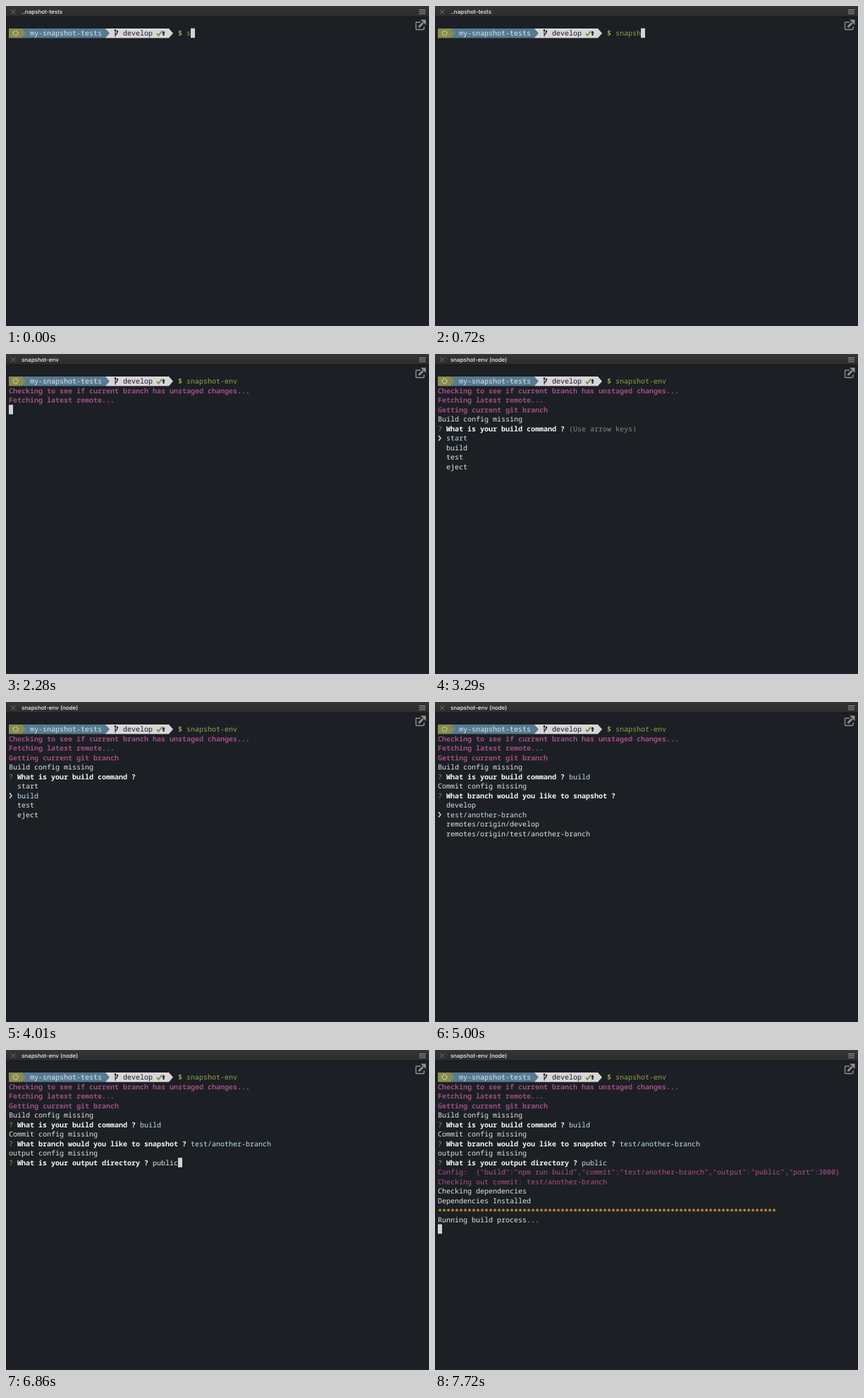
An HTML page that plays this animation: 600 px wide and 455 px high, repeating every 8000 ms.

```html
<!DOCTYPE html>
<html lang="en">
<head>
<meta charset="utf-8">
<title>Terminal session</title>
<style>
  html, body { margin: 0; width: 100%; height: 100%; overflow: hidden; background: #1c2024; }
  svg { display: block; width: 600px; height: 455px; }
  text { white-space: pre; text-rendering: geometricPrecision; }
  #title { font: 500 8px Inter, sans-serif; fill: #f2f2f2; }
  .mono text { font: 500 10px "Noto Sans Mono", "DejaVu Sans Mono", monospace; fill: #e6e6e4; }
  .mono .cmd { fill: #98a04c; font-weight: 400; }
  .mono .dollar { fill: #a9ab55; font-weight: 600; }
  .mono .dir { fill: #e0e5e8; font-weight: 400; }
  .mono .branch { fill: #17181a; font-weight: 400; }
  .mono .log { fill: #a04c84; font-weight: 600; }
  .mono .info { fill: #b04f8e; }
  .mono .mark { fill: #8f9a3c; }
  .mono .ask { fill: #f6f6f4; font-weight: 700; }
  .mono .pick { fill: #c3def3; }
  .mono .hint { fill: #85898c; font-weight: 400; }
  .mono .stars { fill: #d9a441; font-weight: 700; }
  .caret { fill: #d2d3d3; }
</style>
</head>
<body>
<svg viewBox="0 0 600 455">
  <defs>
    <linearGradient id="bar" x2="0" y2="1">
      <stop offset="0" stop-color="#363636"/>
      <stop offset="1" stop-color="#2b2b2b"/>
    </linearGradient>
  </defs>
  <rect width="600" height="455" fill="#1c2024"/>
  <rect width="600" height="15.5" fill="url(#bar)"/>
  <rect y="15" width="600" height="1" fill="#121416"/>
  <rect y="454" width="600" height="1" fill="#1b2546"/>
  <path d="M7 5l6.5 6.5M13.500 5L7 11.500" stroke="#7c7c7c" stroke-width=".9"/>
  <text id="title" x="22" y="11"></text>
  <path d="M586 5.500h9M586 8.200h9M586 10.900h9" stroke="#a2a2a2"/>
  <g fill="none" stroke="#8f9294">
    <path d="M588 23h-5.500q-1 0-1 1v8.500q0 1 1 1h9.500q1 0 1-1V29" stroke-width="1.400"/>
    <path d="M585.500 30l6-6" stroke-width="2.800"/>
    <path d="M588 19.500h7.500V27z" fill="#8f9294" stroke="none"/>
  </g>

  <path d="M141 32h90l6 6.750-6 6.750h-90z" fill="#d9d6da"/>
  <path d="M22 32h119l6 6.750-6 6.750H22z" fill="#577a92"/>
  <path d="M4 32h18l6 6.750-6 6.750H4z" fill="#888b50"/>
  <circle cx="13.500" cy="38.700" r="3.300" fill="none" stroke="#d8d49a" stroke-width="1.300" stroke-dasharray="1.800 .8"/>
  <path d="M155 34v9.500M155 41q3-1 3-4.500" fill="none" stroke="#1b1b1d" stroke-width="1.100"/>
  <circle cx="155" cy="34.500" r="1.300" fill="#1b1b1d"/>
  <circle cx="158" cy="36" r="1.200" fill="#1b1b1d"/>
  <path d="M214 39l2.300 2.800 5-6.300" fill="none" stroke="#7c9440" stroke-width="2"/>
  <path d="M223.500 35.300l2.300 3h-1.200v3.700h-2.200v-3.700h-1.200z" fill="#24262a"/>
  <g class="mono">
    <text class="dir" x="34" y="42">my-snapshot-tests</text>
    <text class="branch" x="166" y="42">develop</text>
    <text class="dollar" x="244" y="42">$</text>
    <g id="screen"></g>
  </g>
</svg>
<script>
  const LOOP = 8000, STEPS_PER_MS = 7 / 1000, CELL = 6, LINE = 13.5;
  const COMMAND = "snapshot-env", FOLDER = "public", BRANCH = "test/another-branch";

  // Key moments, counted in seventh-of-a-second steps.
  const AT = {
    run: 12, check: 14, fetch: 15, branch: 18, build: 19, pickBuild: 26,
    commit: 30, pickCommit: 35, output: 39, type: 43, finish: 49
  };

  const colX = col => 4 + col * CELL;
  const put = (row, col, cls, str, dy = 0) =>
    `<text class="${cls}" x="${colX(col)}" y="${42 + row * LINE + dy}">${str}</text>`;
  const caret = (row, col) =>
    `<rect class="caret" x="${colX(col)}" y="${31.75 + row * LINE}" width="6" height="13.5"/>`;
  const pointer = row =>
    `<path d="M5 ${35 + row * LINE}l3 3.7-3 3.7" fill="none" stroke="#c3def3" stroke-width="1.5"/>`;

  const ask = (row, question, reply = "", cls = "pick") =>
    put(row, 0, "mark", "?") + put(row, 2, "ask", question) +
    put(row, question.length + 3, cls, reply);

  const list = (row, question, items, picked) =>
    ask(row, question, picked ? "" : "(Use arrow keys)", "hint") +
    items.map((item, i) => {
      const y = row + 1 + i, on = i === picked;
      return (on ? pointer(y) : "") + put(y, 2, on ? "pick" : "", item);
    }).join("");

  function screen(step) {
    const typed = COMMAND.slice(0, step + 1);
    let out = put(0, 42, "cmd", typed);
    if (step < AT.run) return out + caret(0, 42 + typed.length);
    if (step < AT.check) return out + caret(1, 0);

    out += put(1, 0, "log", "Checking to see if current branch has unstaged changes...");
    if (step < AT.fetch) return out + caret(2, 0);
    out += put(2, 0, "log", "Fetching latest remote...");
    if (step < AT.branch) return out + caret(3, 0);
    out += put(3, 0, "log", "Getting current git branch");
    if (step < AT.build) return out + caret(4, 0);

    const askBuild = "What is your build command ?";
    out += put(4, 0, "", "Build config missing");
    if (step < AT.commit)
      return out + list(5, askBuild, ["start", "build", "test", "eject"], +(step >= AT.pickBuild));
    out += ask(5, askBuild, "build");

    const askBranch = "What branch would you like to snapshot ?";
    out += put(6, 0, "", "Commit config missing");
    if (step < AT.output) {
      const refs = ["develop", BRANCH, "remotes/origin/develop", "remotes/origin/" + BRANCH];
      return out + list(7, askBranch, refs, +(step >= AT.pickCommit));
    }
    out += ask(7, askBranch, BRANCH);

    const askFolder = "What is your output directory ?";
    const folder = FOLDER.slice(0, Math.max(0, step - AT.type + 1));
    out += put(8, 0, "", "output config missing");
    if (step < AT.finish)
      return out + ask(9, askFolder, folder, "") + caret(9, askFolder.length + 3 + folder.length);

    const config = { build: "npm run build", commit: BRANCH, output: FOLDER, port: 3000 };
    return out + ask(9, askFolder, FOLDER) +
      put(10, 0, "info", "Config:  " + JSON.stringify(config)) +
      put(11, 0, "info", "Checking out commit: " + BRANCH) +
      put(12, 0, "", "Checking dependencies") +
      put(13, 0, "", "Dependencies Installed") +
      put(14, 0, "stars", "*".repeat(80), 1.8) +
      put(15, 0, "", "Running build process...") +
      caret(16, 0);
  }

  const titleFor = step =>
    step < AT.run ? "..napshot-tests" : step < AT.build ? COMMAND : COMMAND + " (node)";

  const titleEl = document.getElementById("title");
  const screenEl = document.getElementById("screen");
  let shown = -1;

  function draw() {
    const step = Math.floor((performance.now() % LOOP + 5) * STEPS_PER_MS);
    if (step !== shown) {
      shown = step;
      titleEl.textContent = titleFor(step);
      screenEl.innerHTML = screen(step);
    }
    requestAnimationFrame(draw);
  }
  draw();
</script>
</body>
</html>
```
